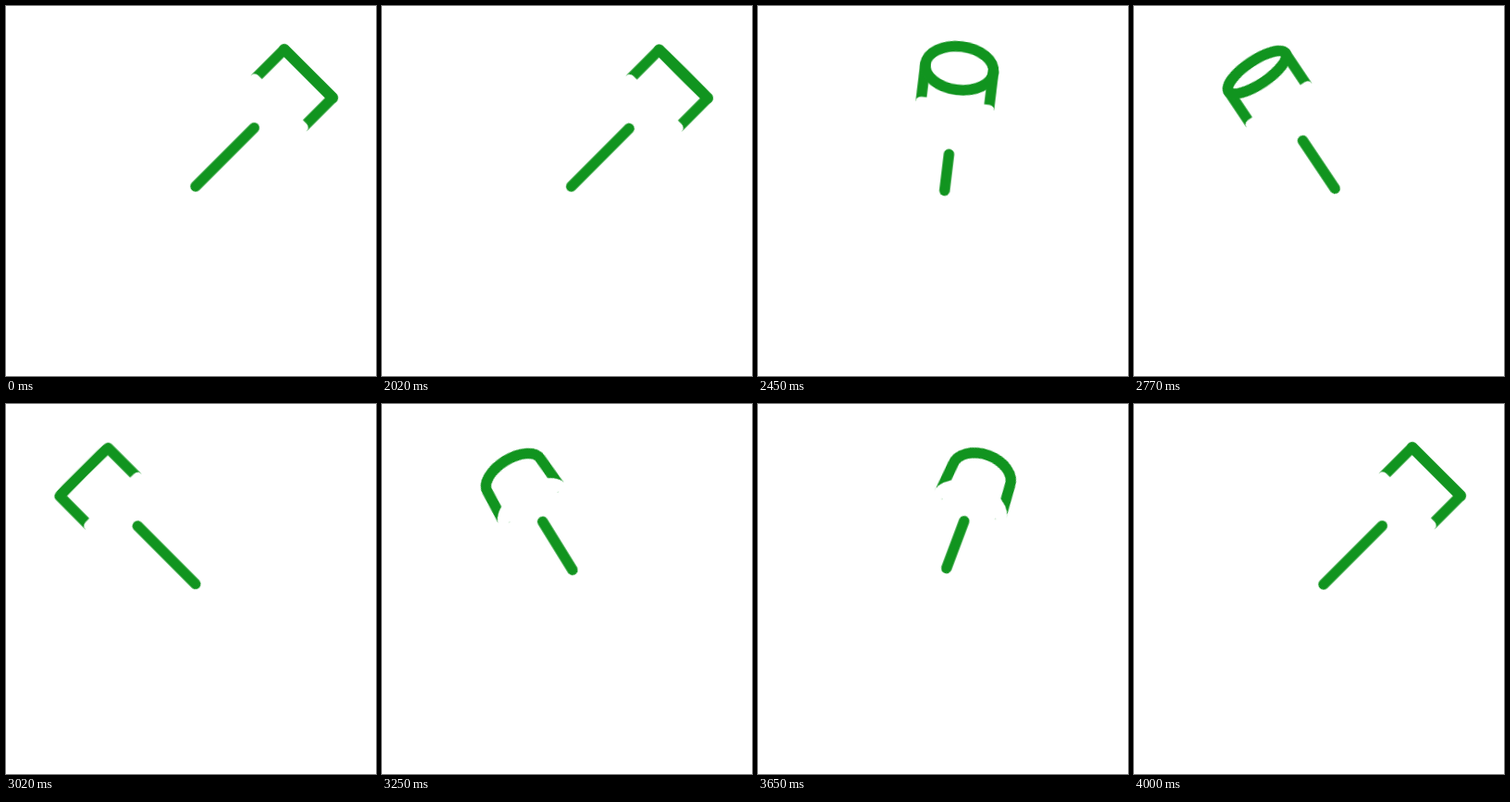
An HTML page without scripts that plays this animation: 400 px wide and 400 px high, repeating every 4.02 s.

```html
<!DOCTYPE html>
<html lang="en">
<head>
<meta charset="utf-8">
<title>Swinging cup</title>
<style>
  html, body { margin: 0; width: 100%; height: 100%; overflow: hidden; background: #fff; }
  svg { display: block; width: 100vw; height: 100vh; }

  g, path { animation: 4020ms linear infinite; }
  path { fill: none; stroke: #11941f; stroke-width: 11.4; stroke-linejoin: round; }

  .swing { animation-name: swing; }
  .slide { animation-name: lean, sway; }
  .cup { animation-name: cup; }
  .rim { animation-name: rim, hide; stroke-linecap: round; }
  .base { animation-name: base; fill: #fff; stroke: #fff; stroke-linecap: round; }
  .stem { animation-name: stem; stroke-linecap: round; }

  /* Rest for 2 s, then swing left tipped forward and back tipped away in 2 s. */
  @keyframes swing {
    0%, 49.751% { transform: rotate(45deg); animation-timing-function: cubic-bezier(.364, 0, .636, 1); }
    74.627% { transform: rotate(-45deg); animation-timing-function: cubic-bezier(.364, 0, .636, 1); }
    99.502%, 100% { transform: rotate(45deg); }
  }
  @keyframes lean {
    0%, 49.751% { transform: translateY(-172.5px); animation-timing-function: cubic-bezier(.25, .1, .4, 1); }
    62.189% { transform: translateY(-128px); animation-timing-function: cubic-bezier(.6, 0, .75, .9); }
    74.627% { transform: translateY(-172.5px); animation-timing-function: cubic-bezier(.25, .1, .4, 1); }
    87.065% { transform: translateY(-118.5px); animation-timing-function: cubic-bezier(.6, 0, .75, .9); }
    99.502%, 100% { transform: translateY(-172.5px); }
  }
  @keyframes sway {
    0%, 49.751%, 74.627% { translate: 0px; animation-timing-function: cubic-bezier(.364, 0, .636, 1); }
    55.97%, 93.284% { translate: -9px; animation-timing-function: cubic-bezier(.364, 0, .636, 1); }
    68.408%, 80.846% { translate: 9px; animation-timing-function: cubic-bezier(.364, 0, .636, 1); }
    99.502%, 100% { translate: 0px; }
  }
  @keyframes cup {
    0%, 49.751% {
      d: path("M-37 45.5L-37 0A37 0 0 0 1 37 0L37 45.5");
      animation-timing-function: cubic-bezier(.3, .1, .6, 1);
    }
    62.189% {
      d: path("M-37 41L-37 0A37 24 0 0 1 37 0L37 41");
      animation-timing-function: cubic-bezier(.4, 0, .7, .9);
    }
    74.627% {
      d: path("M-37 45.5L-37 0A37 0 0 0 1 37 0L37 45.5");
      animation-timing-function: cubic-bezier(.25, .1, .4, 1);
    }
    87.065% {
      d: path("M-36 38L-32.5 0A32.5 25 0 0 1 32.5 0L36 38");
      animation-timing-function: cubic-bezier(.6, 0, .75, .9);
    }
    99.502%, 100% { d: path("M-37 45.5L-37 0A37 0 0 0 1 37 0L37 45.5"); }
  }
  @keyframes rim {
    0%, 49.751% { d: path("M-37 0A37 0 0 0 0 37 0"); animation-timing-function: cubic-bezier(.3, .1, .6, 1); }
    62.189% { d: path("M-37 0A37 24 0 0 0 37 0"); animation-timing-function: cubic-bezier(.4, 0, .7, .9); }
    74.627%, 100% { d: path("M-37 0A37 0 0 0 0 37 0"); }
  }
  @keyframes hide {
    0% { opacity: 1; animation-timing-function: step-end; }
    74.627% { opacity: 0; animation-timing-function: step-end; }
    99.502%, 100% { opacity: 1; }
  }
  @keyframes base {
    0%, 49.751% { d: path("M-37 45.5A37 0 0 0 1 37 45.5"); animation-timing-function: cubic-bezier(.3, .1, .6, 1); }
    62.189% { d: path("M-37 41A37 0 0 0 1 37 41"); animation-timing-function: cubic-bezier(.4, 0, .7, .9); }
    74.627% { d: path("M-37 45.5A37 0 0 0 1 37 45.5"); animation-timing-function: cubic-bezier(.25, .1, .4, 1); }
    87.065% { d: path("M-37 38A37 26 0 0 1 37 38"); animation-timing-function: cubic-bezier(.6, 0, .75, .9); }
    99.502%, 100% { d: path("M-37 45.5A37 0 0 0 1 37 45.5"); }
  }
  @keyframes stem {
    0%, 49.751% { d: path("M0 83L0 172.5"); animation-timing-function: cubic-bezier(.3, .1, .6, 1); }
    62.189% { d: path("M0 94L0 132.5"); animation-timing-function: cubic-bezier(.4, 0, .7, .9); }
    74.627% { d: path("M0 83L0 172.5"); animation-timing-function: cubic-bezier(.25, .1, .4, 1); }
    87.065% { d: path("M0 50L0 101"); animation-timing-function: cubic-bezier(.6, 0, .75, .9); }
    99.502%, 100% { d: path("M0 83L0 172.5"); }
  }
</style>
</head>
<body>
<svg viewBox="0 0 400 400">
  <g transform="translate(205 195)">
    <g class="swing">
      <g class="slide">
        <path class="cup" d="M-37 45.5L-37 0A37 0 0 0 1 37 0L37 45.5"/>
        <path class="rim" d="M-37 0A37 0 0 0 0 37 0"/>
        <path class="base" d="M-37 45.5A37 0 0 0 1 37 45.5"/>
        <path class="stem" d="M0 83L0 172.5"/>
      </g>
    </g>
  </g>
</svg>
</body>
</html>
```
